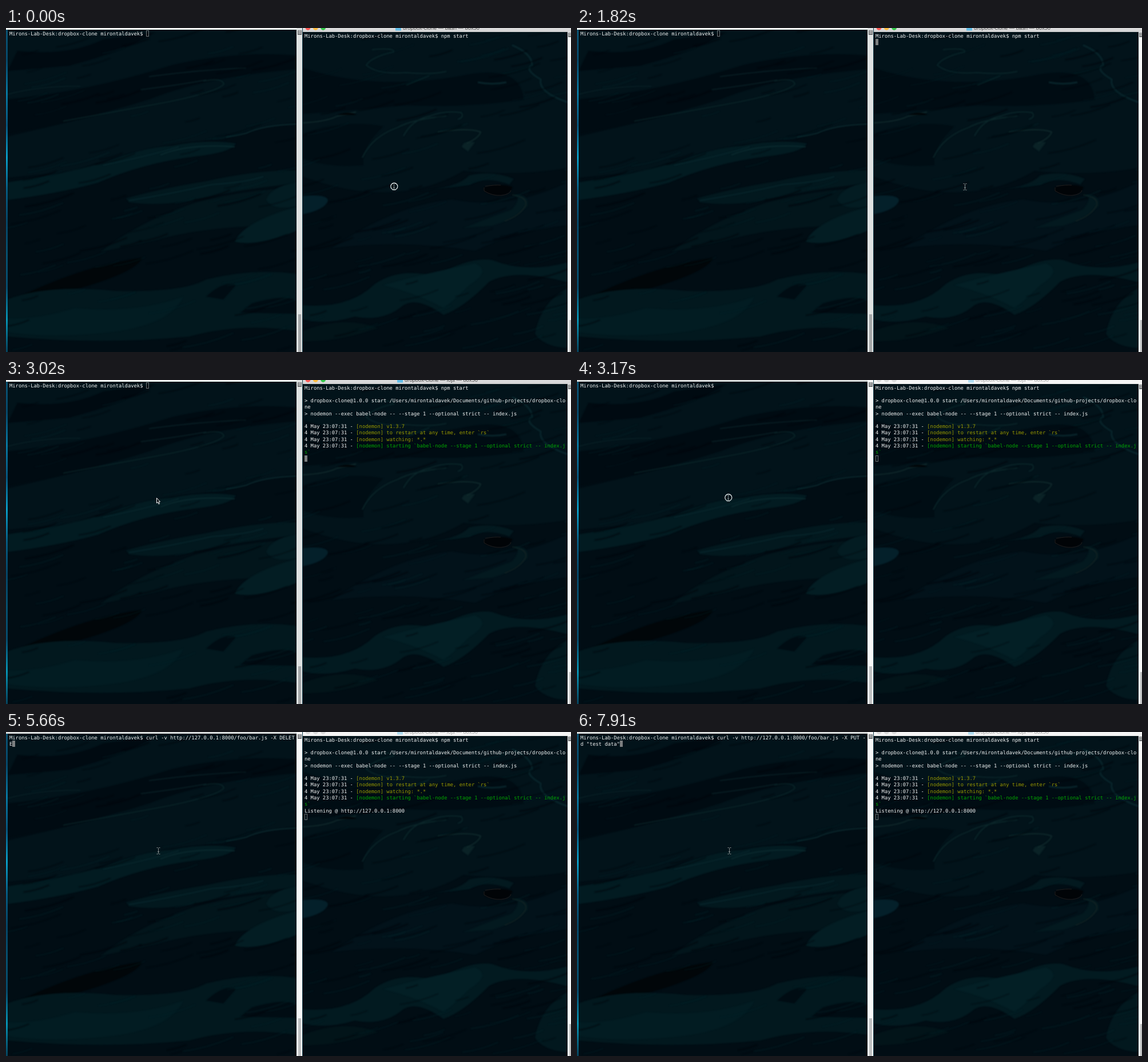
An HTML page with a canvas for the animation above (8000 ms loop, 988 by 567 pixels).

```html
<!DOCTYPE html>
<html lang="en">
<head>
<meta charset="utf-8">
<title>Two terminals</title>
<style>
html, body { margin: 0; width: 100%; height: 100%; overflow: hidden; background: #000b12; }
canvas { display: block; }
</style>
</head>
<body>
<canvas id="stage" width="988" height="567"></canvas>
<script>
const LOOP = 8000, W = 988, H = 567, CELL = 5.31, ROW = 11.27;
const LEFT = { x: 6, y: 4 }, RIGHT = { x: 522, y: 8 };
const WHITE = '#f2f2f2', YELLOW = '#999900', GREEN = '#00a600';
const ctx = document.getElementById('stage').getContext('2d');

const PROMPT = 'Mirons-Lab-Desk:dropbox-clone mirontaldavek$ ';
const SCRIPT = [
  '',
  '> dropbox-clone@1.0.0 start /Users/mirontaldavek/Documents/github-projects/dropbox-clo',
  'ne',
  '> nodemon --exec babel-node -- --stage 1 --optional strict -- index.js',
  ''
];
const STAMP = '4 May 23:07:31 - ';
const NODEMON = [
  ['[nodemon] v1.3.7', YELLOW],
  ['[nodemon] to restart at any time, enter `rs`', YELLOW],
  ['[nodemon] watching: *.*', YELLOW],
  ['[nodemon] starting `babel-node --stage 1 --optional strict -- index.j', GREEN]
];
const CURL = 'curl -v http://127.0.0.1:8000/foo/bar.js -X ';

// Step tables: [start time, value...]
const COMMANDS = [[0, ''], [5210, 'curl '], [5660, CURL + 'DELETE'],
  [7310, CURL + 'POST -d "test data"'], [7910, CURL + 'PUT -d "test data"']];
const LEFT_BLINK = [[0, 0], [3710, 1], [4310, 0], [4760, 1], [6260, 0], [6710, 1]];
const RIGHT_BLINK = [[0, 0], [470, 1], [920, 0], [1520, 1]];
const MOUSE = [[0, 678, 278, 'beam', 1], [150, 678, 278, 'beam'], [2570, 653, 262, 'beam'],
  [2720, 538, 184, 'beam'], [2870, 305, 164, 'arrow'], [3020, 263, 206, 'arrow'],
  [3170, 264, 206.5, 'beam', 1], [3320, 264, 206.5, 'beam'], [3560, 266, 208, 'beam']];
const stepAt = (steps, t) => steps.filter(s => s[0] <= t).pop();

// Wallpaper seen through both windows: [colour, path, line width (0 = fill)]
const WAVES = [
  ['#02131a', 'M3 3H508V165Q420 175 380 195Q250 200 120 250L3 262V190L170 150Q60 150 3 160Z'],
  ['#000b12', 'M3 125Q150 110 290 65Q400 40 508 48L508 72Q350 85 250 125Q120 165 3 185Z'],
  ['#000a11', 'M20 40Q110 50 170 20L260 8Q210 40 110 66L3 75Z'],
  ['#021b21', 'M3 270Q90 258 170 236Q240 208 290 206Q350 194 402 202Q395 218 330 225Q240 236 160 271Q90 290 3 301Z'],
  ['#02181e', 'M210 298Q270 281 350 268Q440 248 508 249V272Q430 280 370 292Q280 315 215 305Z'],
  ['#02151b', 'M165 392Q230 340 330 306Q420 282 508 280V345Q350 345 260 372Z'],
  ['#031c22', 'M455 300Q465 277 508 270V312Q465 320 455 300Z'],
  ['#031d23', 'M400 374Q415 339 508 313V355Q440 383 400 374Z'],
  ['#010609', 'M3 480Q130 416 238 402Q230 426 130 455L3 488Z'],
  ['#02181e', 'M3 475Q70 448 190 460Q310 463 350 440Q430 420 508 430V530Q410 515 320 540Q170 555 3 540Z'],
  ['#021c22', 'M3 508Q60 510 120 490Q230 500 310 470Q290 515 200 530Q90 545 3 532Z'],
  ['#000c13', 'M350 470Q380 442 402 450L380 475ZM430 482Q490 465 508 478V500L410 498Z'],
  ['#02131a', 'M519 8H982V245Q890 260 800 250Q680 320 519 260Z'],
  ['#000c13', 'M519 70Q640 110 790 85Q900 60 905 125Q810 140 700 135Q600 145 519 150Z'],
  ['#000d14', 'M519 185Q590 160 660 172Q620 210 625 240Q560 245 519 228Z'],
  ['#02121a', 'M570 385Q680 310 780 300Q880 320 982 270V345Q890 355 820 390Q700 370 570 385Z'],
  ['#021a20', 'M519 485Q600 492 645 448Q690 418 750 435Q810 400 850 406Q910 430 982 410V445Q890 420 845 444Q800 490 765 502Q720 470 695 485Q660 515 610 505Q560 520 519 510Z'],
  ['#031f25', 'M660 450Q730 430 820 412Q850 425 810 450Q780 480 765 490Q720 465 660 450Z'],
  ['#02181e', 'M925 535Q935 480 982 455V560Q940 558 925 535Z'],
  ['#021419', 'M519 530Q590 502 650 525Q580 550 519 548Z'],
  ['#04202a', 'M519 294Q562 290 563 302Q558 318 519 326Z'],
  ['#03191f', 'M800 350Q850 330 884 318Q905 295 885 291Q917 290 912 312Q890 335 850 346Z'],
  ['#03191f', 'M720 285Q790 280 810 258Q850 248 888 264L880 274Q840 258 810 275Z'],
  ['#0a2226', 'M797 208Q800 196 820 200L808 216Z'],
  ['#0a2629', 'M100 163Q200 145 280 130Q370 112 381 98Q378 86 345 93', 1.6],
  ['#0a2328', 'M3 116Q60 101 130 102M235 108Q300 100 350 91M250 85Q340 73 420 70', 1.3],
  ['#0b292e', 'M385 191Q400 189 420 184Q450 170 508 168M270 222Q320 202 400 208', 2],
  ['#07242a', 'M215 302Q290 290 360 274Q420 270 450 260M170 240Q250 224 302 208', 2],
  ['#0a2529', 'M640 38Q680 34 678 42Q640 50 630 65Q650 82 700 78Q745 82 770 76M700 100L740 84', 1.8],
  ['#08242a', 'M885 30Q920 45 920 65Q905 72 935 90Q930 112 982 130M825 95Q850 100 875 95', 3],
  ['#122b2d', 'M519 166Q560 164 580 154L612 147', 1.8],
  ['#0b272a', 'M623 227Q640 190 685 174Q710 160 770 154M695 189Q710 160 742 154Q765 144 796 148Q802 156 790 160', 1.8],
  ['#10292b', 'M755 182Q810 174 830 182Q827 192 806 202', 2],
  ['#142323', 'M885 292Q912 296 909 310Q900 328 872 338', 1.6],
  ['#000204', 'M579 152Q600 145 613 152Z'],
  ['#010407', 'M836 279Q860 271 886 278Q880 293 862 293Q840 291 836 284Z']
];

function paintWallpaper() {
  const layer = Object.assign(document.createElement('canvas'), { width: W, height: H });
  const c = layer.getContext('2d');
  c.fillStyle = '#010d14';
  c.fillRect(0, 0, W, H);
  c.filter = 'blur(1px)';
  for (const [color, d, width] of WAVES) {
    c.fillStyle = c.strokeStyle = color;
    c.lineWidth = width || 1;
    width ? c.stroke(new Path2D(d)) : c.fill(new Path2D(d));
  }
  // Fine diagonal ripples
  let seed = 7;
  const random = () => (seed = seed * 16807 % 2147483647) / 2147483647;
  for (let i = 0; i < 260; i++) {
    const x = random() * W, y = random() * H, len = 20 + random() * 70;
    c.strokeStyle = random() < .5 ? 'rgba(0,5,11,.5)' : 'rgba(4,36,42,.35)';
    c.lineWidth = 1 + random() * 2;
    c.beginPath();
    c.moveTo(x, y);
    c.quadraticCurveTo(x + len / 2, y - len * .06, x + len, y - len * .28);
    c.stroke();
  }
  c.filter = 'none';
  c.strokeStyle = '#2a2422';
  c.lineWidth = .8;
  c.stroke(new Path2D('M836 279V285Q850 294 866 293Q882 291 883 284M838 277Q855 274 865 275'));
  return layer;
}
const wallpaper = paintWallpaper();

function box(x, y, w, h, color) {
  ctx.fillStyle = color;
  ctx.fillRect(x, y, w, h);
}

function gradientBox(x, y, w, h, colors) {
  const g = ctx.createLinearGradient(0, y, 0, y + h);
  colors.forEach((color, i) => g.addColorStop(i / (colors.length - 1), color));
  box(x, y, w, h, g);
}

function disc(x, y, r, color) {
  ctx.fillStyle = color;
  ctx.beginPath();
  ctx.arc(x, y, r, 0, 7);
  ctx.fill();
}

function write(pane, row, col, text, color = WHITE) {
  ctx.font = '8.82px "DejaVu Sans Mono", monospace';
  ctx.textAlign = 'left';
  ctx.fillStyle = color;
  ctx.fillText(text, pane.x + col * CELL, pane.y + row * ROW + 8.6);
}

function caret(pane, row, col, hollow) {
  const x = Math.round(pane.x + col * CELL), y = Math.round(pane.y + row * ROW);
  if (!hollow) return box(x, y, 5, 11, '#7c7f80');
  ctx.strokeStyle = '#6f7374';
  ctx.lineWidth = 1;
  ctx.strokeRect(x + .5, y + .5, 4, 10);
}

function scrollIcon(x, y) {
  box(x, y, 7, 8, '#6d7072');
  box(x + 1, y + 1, 5, 6, '#e4e6e6');
  for (let i = 2; i < 7; i += 2) box(x + 1, y + i, 5, 1, '#55585a');
}

function drawChrome(t) {
  const rightActive = t < 3170;
  gradientBox(0, 0, 3, H, ['#0a5272', '#06486a', '#0877a0', '#06547c', '#0a9bc4', '#065a80',
    '#054566', '#06506f', '#064b6c', '#0792b2', '#05425c']);
  box(0, 0, 508, 3, rightActive ? '#f3faf6' : '#d9dcdc');

  box(508, 0, 10, H, rightActive ? '#dfe2e2' : '#f7f8f8');
  box(511, 501, 5, 70, rightActive ? '#a5a8a9' : '#bfc1c2');
  scrollIcon(510, 4);
  box(518, 0, 1, H, '#123c49');

  gradientBox(519, 0, 469, 7, rightActive ? ['#dededf', '#d1d1d2'] : ['#f7f7f7', '#f3f3f3']);
  box(519, 7, 463, 1, '#04161c');
  const lights = rightActive ? ['#fc5b57', '#fdbc40', '#34c84a'] : ['#dcdcdc', '#dcdcdc', '#dcdcdc'];
  lights.forEach((color, i) => disc(528 + i * 13.3, -.5, 4.4, color));

  const title = `dropbox-clone — ${t < 1970 ? 'bash' : 'iojs'} — 80x50`;
  ctx.font = '9.35px "Liberation Sans", Arial, sans-serif';
  ctx.textAlign = 'center';
  ctx.fillStyle = rightActive ? '#4c4c4c' : '#a9a9a9';
  ctx.fillText(title, 761, 3);
  box(748 - ctx.measureText(title).width / 2, 0, 10, 4.5, rightActive ? '#62bde8' : '#b0def3');

  box(982, 7, 6, H, '#fafbfb');
  scrollIcon(983, 8);
  box(985, 511, 3, 60, '#bfc1c2');
}

function drawLeft(t) {
  const line = PROMPT + stepAt(COMMANDS, t)[1], columns = 94;
  write(LEFT, 0, 0, line.slice(0, columns));
  write(LEFT, 1, 0, line.slice(columns));
  const inactive = t < 3170;
  if (inactive || stepAt(LEFT_BLINK, t)[1])
    caret(LEFT, Math.floor(line.length / columns), line.length % columns, inactive);
}

function drawRight(t) {
  const command = PROMPT + 'npm start';
  let row = 0, col = command.length;
  write(RIGHT, 0, 0, command);
  if (t >= 1820) { row = 1; col = 0; }
  if (t >= 2270) {
    SCRIPT.forEach((text, i) => write(RIGHT, i + 1, 0, text));
    row = 6;
  }
  if (t >= 2570) {
    NODEMON.forEach(([text, color], i) => {
      write(RIGHT, 6 + i, 0, STAMP);
      write(RIGHT, 6 + i, STAMP.length, text, color);
    });
    write(RIGHT, 10, 0, 's`', GREEN);
    row = 11;
  }
  if (t >= 3560) {
    write(RIGHT, 11, 0, 'Listening @ http://127.0.0.1:8000');
    row = 12;
  }
  if (stepAt(RIGHT_BLINK, t)[1]) caret(RIGHT, row, col, t >= 3170);
}

function drawMouse(t) {
  const [, x, y, kind, pressed] = stepAt(MOUSE, t);
  ctx.save();
  ctx.translate(x, y);
  ctx.lineWidth = 1;
  if (kind === 'arrow') {
    ctx.fillStyle = '#05090c';
    ctx.strokeStyle = '#f4f4f4';
    const arrow = new Path2D('M.5 .5V9.5L2.5 7.6L4 11.2L5.5 10.5L4 7H6.5Z');
    ctx.fill(arrow);
    ctx.stroke(arrow);
  } else {
    ctx.strokeStyle = '#858a8b';
    ctx.stroke(new Path2D('M-2.5 -5.5H-.5L.5 -4.5L1.5 -5.5H3.5M-2.5 5.5H-.5L.5 4.5L1.5 5.5H3.5M.5 -4.5V4.5M-1 1.5H2'));
  }
  if (pressed) {
    ctx.strokeStyle = '#e8ecec';
    ctx.lineWidth = 1.2;
    ctx.beginPath();
    ctx.arc(.8, -.8, 6, 0, 7);
    ctx.stroke();
  }
  ctx.restore();
}

function frame() {
  const t = performance.now() % LOOP;
  ctx.textRendering = 'geometricPrecision';
  ctx.drawImage(wallpaper, 0, 0);
  drawChrome(t);
  drawLeft(t);
  drawRight(t);
  drawMouse(t);
  requestAnimationFrame(frame);
}
frame();
</script>
</body>
</html>
```
